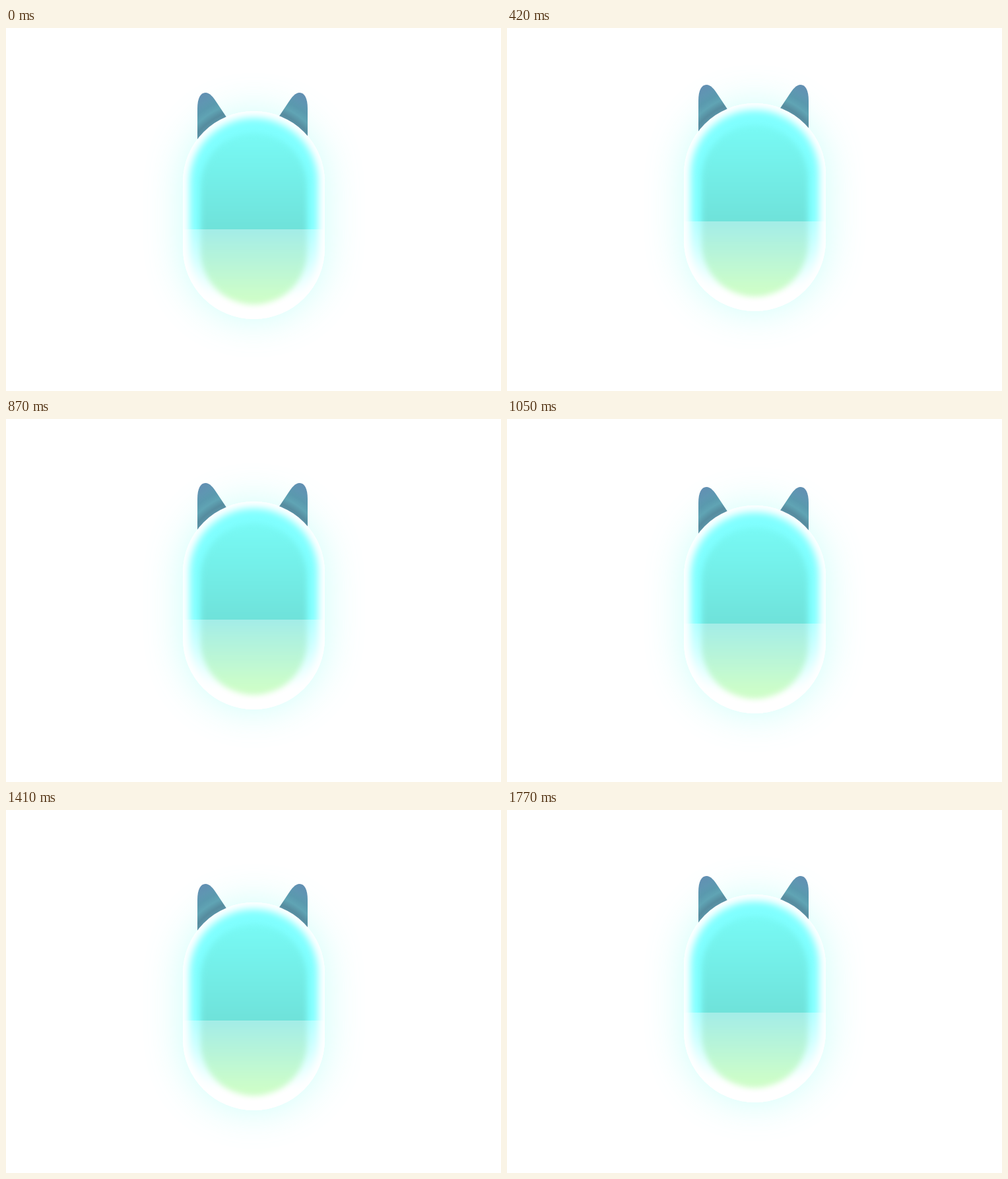
An HTML page that plays this animation: 750 by 550 pixels, repeating every 1800 ms.

```html
<!DOCTYPE html>
<html lang="en">
<head>
<meta charset="utf-8">
<title>Floating pill</title>
<style>
  html, body { margin: 0; width: 100%; height: 100%; overflow: hidden; background: #fff; }
  #pet { position: absolute; left: 0; top: 0; width: 750px; height: 550px; }
  svg, .body, .body div { position: absolute; }
  .halo, .body { left: 268px; top: 126px; width: 215px; height: 315px; border-radius: 107.5px; }
  .halo { position: absolute; box-shadow: 0 0 58px rgba(100, 255, 238, .32); }
  .body { background: #fff; overflow: hidden; }
  .body .rim {
    inset: 10px 10px 8px; border-radius: 98px; filter: blur(6px);
    background: linear-gradient(#80ffff 56%, #fff 92%);
  }
  .body .core {
    inset: 33px 27px 22px; border-radius: 81px; filter: blur(4.5px);
    background: linear-gradient(#78faf5, #6fe2da 56%, #b1fca9 96%);
  }
  .body .shine { inset: 179px 0 0; background: rgba(255, 255, 255, .36); }
</style>
</head>
<body>
<div id="pet">
  <div class="halo"></div>
  <svg width="750" height="550">
    <defs>
      <radialGradient id="fur" gradientUnits="userSpaceOnUse" cx="375.5" cy="233.5" r="160">
        <stop offset=".67" stop-color="#5a93a6"/>
        <stop offset=".71" stop-color="#568c9f"/>
        <stop offset=".77" stop-color="#60a4b4"/>
        <stop offset=".83" stop-color="#5a99ae"/>
        <stop offset=".89" stop-color="#5f96b2"/>
        <stop offset=".97" stop-color="#628fb2"/>
      </radialGradient>
      <path id="ear" fill="url(#fur)"
        d="M290 172V122C290 106 295 98 302 98C309 98 314 105 319 112.500L338 141Z"/>
    </defs>
    <use href="#ear"/>
    <use href="#ear" transform="translate(747 0) scale(-1 1)"/>
  </svg>
  <div class="body">
    <div class="rim"></div>
    <div class="core"></div>
    <div class="shine"></div>
  </div>
</div>
<script>
  const LOOP = 1800, STEP = 30;
  const pet = document.getElementById("pet");
  // [time in ms, vertical offset]: quick departure and slow arrival each way
  const path = [
    [0, 0], [240, -8], [420, -12.4], [570, -14.4], [600, -15], [690, -10.8],
    [870, -1], [960, 2.2], [1200, 10], [1380, 13.4], [1470, 14.4], [1500, 15],
    [1590, 11], [1650, 8], [1770, 2], [1800, 0]
  ];

  function offset(t) {
    const i = path.findIndex(p => p[0] > t);
    const [t0, y0] = path[i - 1], [t1, y1] = path[i];
    return y0 + (y1 - y0) * (t - t0) / (t1 - t0);
  }

  function draw() {
    const t = Math.floor(performance.now() % LOOP / STEP) * STEP;
    pet.style.transform = `translateY(${Math.round(offset(t))}px)`;
    requestAnimationFrame(draw);
  }
  draw();
</script>
</body>
</html>
```
